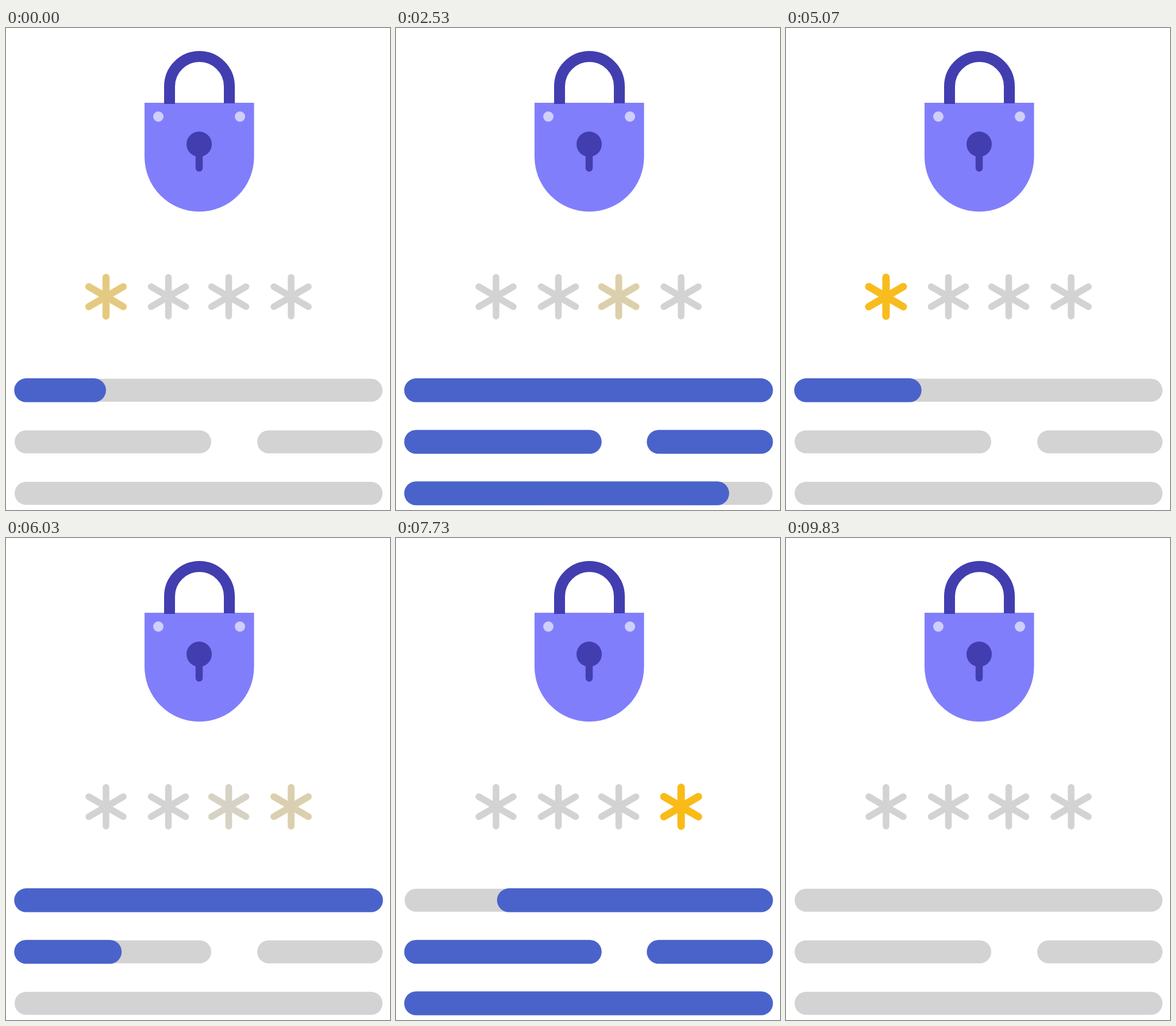
An HTML page for the animation above (9910 ms loop, 668 by 838 pixels).

```html
<!DOCTYPE html>
<html lang="en">
<head>
<meta charset="utf-8">
<title>Padlock</title>
<style>
  html, body { margin: 0; width: 100%; height: 100%; overflow: hidden; background: #fff; }
  svg { display: block; width: 100vw; height: 100vh; }
  line, path { stroke-linecap: round; fill: none; }
</style>
</head>
<body>
<svg viewBox="0 0 668 838">
  <path d="M241 130H431.5V224A95.2 95.2 0 0 1 241 224Z" style="fill:#817efc"/>
  <path id="shackle" d="M284.5 132V101.5A52 52 0 0 1 388.5 101.5V131" stroke="#423eb0" stroke-width="19" style="stroke-linecap:butt"/>
  <g fill="#cfcffb"><circle cx="265" cy="154" r="9"/><circle cx="407" cy="154" r="9"/></g>
  <circle cx="336" cy="202" r="22" fill="#423eb0"/>
  <path d="M336 202V243.5" stroke="#423eb0" stroke-width="12.5"/>
  <g id="stars"></g>
  <g id="bars"></g>
</svg>
<script>
const GREY = '#d3d3d3', BLUE = '#4a63cb', YELLOW = '#f9bb18';
const LOOP = 9910, LAST = 9830, HALF = 5000;
const STAR_STEP = 354, STAR_CYCLE = 1533;
const $ = id => document.getElementById(id);
const clamp = x => Math.min(1, Math.max(0, x));
const ramp = (t, from, to) => clamp((t - from) / (to - from));
const ease = x => (1 - Math.cos(Math.PI * x)) / 2;

function add(parent, tag, attrs) {
  const node = document.createElementNS('http://www.w3.org/2000/svg', tag);
  for (const key in attrs) node.setAttribute(key, attrs[key]);
  return parent.appendChild(node);
}

const stars = [174, 282.5, 387.5, 496].map(x => {
  const d = `M${x} 433.5v67.5M${x - 30} 449.7l60 34.8M${x - 30} 484.5l60 -34.8`;
  add($('stars'), 'path', { d, stroke: GREY, 'stroke-width': 11.5 });
  return add($('stars'), 'path', { d, stroke: YELLOW, 'stroke-width': 13 });
});

// Times are relative to the start of each half of the loop.
const bars = [
  { x1: 35, x2: 635, y: 629.8, fill: [-133, 547], clear: [2548, 3228] },
  { x1: 35, x2: 337, y: 719.5, fill: [636, 1456], clear: [3228, 3600] },
  { x1: 457, x2: 635, y: 719.5, fill: [1456, 1940], clear: [3600, 3930] },
  { x1: 35, x2: 635, y: 809, fill: [1940, 2617], clear: [3950, 4630] }
];
for (const bar of bars) {
  const { x1, x2, y } = bar;
  add($('bars'), 'line', { x1, x2, y1: y, y2: y, stroke: GREY, 'stroke-width': 40 });
  bar.node = add($('bars'), 'line', { y1: y, y2: y, stroke: BLUE, 'stroke-width': 41.5 });
}

function starGlow(t, i) {
  let glow = 0;
  for (let cycle = 0; cycle < 2; cycle++) {
    const age = t + 55 - i * STAR_STEP - cycle * STAR_CYCLE;
    glow += ramp(age, 0, 130) * (1 - ramp(age, 244, 425)) ** 2;
  }
  return glow;
}

function draw(time) {
  // Runs from -150 up so that the first bar can lead into each half.
  const t = (Math.min(time, LAST) + 150) % HALF - 150;
  stars.forEach((star, i) => star.setAttribute('opacity', starGlow(t, i)));
  for (const { x1, x2, fill, clear, node } of bars) {
    const head = ramp(t, ...fill), tail = ramp(t, ...clear);
    node.setAttribute('x1', x1 + (x2 - x1) * tail);
    node.setAttribute('x2', x1 + (x2 - x1) * head);
    node.setAttribute('visibility', head > 0 && tail < 1 ? 'visible' : 'hidden');
  }
  const open = ease(ramp(t, 2930, 3400)) - ease(ramp(t, 4150, 4620));
  $('shackle').setAttribute('transform', `rotate(${-40 * open} 285 131)`);
}

const start = performance.now();
function frame() {
  draw((performance.now() - start) % LOOP);
  requestAnimationFrame(frame);
}
frame();
</script>
</body>
</html>
```
